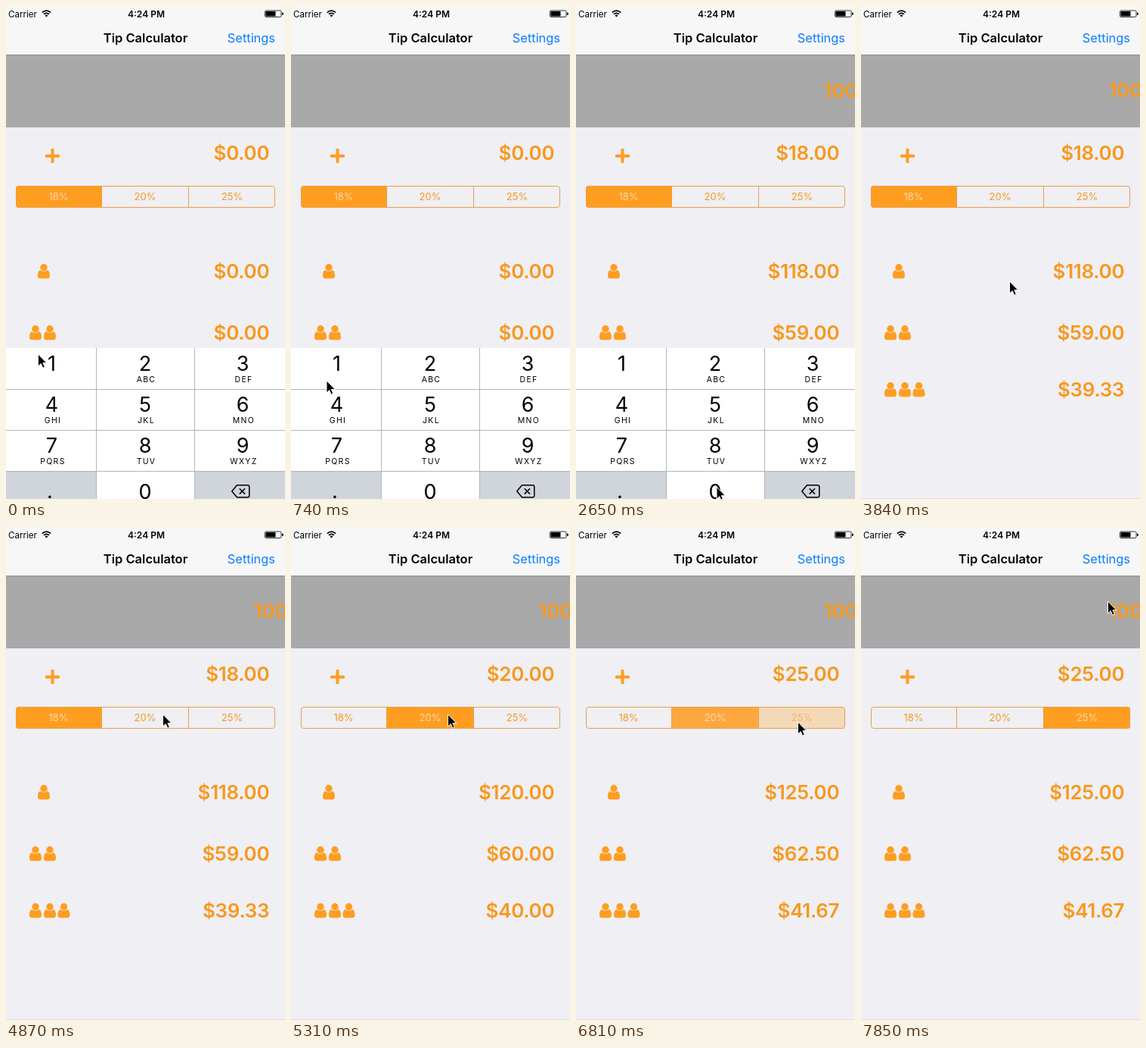
Animation of 369 by 650 pixels, one loop 8000 ms. Source, as an HTML page:

```html
<!DOCTYPE html>
<html lang="en">
<head>
<meta charset="utf-8">
<title>Tip Calculator</title>
<style>
html, body { margin: 0; width: 100%; height: 100%; overflow: hidden; background: #efeff4; }
svg { display: block; font-family: Inter, Roboto, sans-serif; }
.value { font-size: 26px; font-weight: 600; letter-spacing: -.3px; text-anchor: end; fill: #f8981d; }
.seg { font-size: 13px; text-anchor: middle; }
.digit { font-size: 27px; text-anchor: middle; }
.letters { font-size: 10.5px; letter-spacing: 1.3px; text-anchor: middle; }
</style>
</head>
<body>
<svg id="stage" width="369" height="650" viewBox="0 0 369 650"></svg>
<script>
const ORANGE = '#ff9d20', PALE = '#fbd9ac', LOOP = 8000;

const rect = (x, y, w, h, fill, extra = '') =>
  `<rect x="${x}" y="${y}" width="${w}" height="${h}" fill="${fill}" ${extra}/>`;
const text = (x, y, content, attrs = '') => `<text x="${x}" y="${y}" ${attrs}>${content}</text>`;

const person = (x, y) => `<g transform="translate(${x} ${y})" fill="${ORANGE}">
  <circle cy="4.8" r="4.7"/>
  <path d="M-4.4 8.2C-7 8.6-8 11.7-8 15.5Q-8 19.3-4.8 19.3H4.8Q8 19.3 8 15.5C8 11.7 7 8.6 4.4 8.2Q0 11.9-4.4 8.2Z"/></g>`;

const statusBar = () => `
  ${text(3, 14.5, 'Carrier', 'font-size="11.6"')}
  <g fill="none" stroke="#000" stroke-width="1.7">
    <path d="M47.8 8.6Q53.5 3.6 59.2 8.6M50 10.9Q53.5 7.8 57 10.9"/></g>
  <path d="M51.5 12.4Q53.5 10.8 55.5 12.4L53.5 14.6Z"/>
  ${text(185.5, 14.5, '4:24 PM', 'font-size="12" font-weight="600" text-anchor="middle"')}
  ${rect(342.5, 6, 21.5, 8.5, 'none', 'rx="1.5" stroke="#000" stroke-width=".8"')}
  ${rect(343.5, 7, 13, 6.5, '#000', 'rx=".5"')}
  <path d="M365 8.5Q367 8.7 367 10.2T365 12Z"/>`;

const navBar = () => `
  ${rect(0, 0, 369, 64, '#f7f7f8')}${rect(0, 64, 369, 1, '#8f8f91')}
  ${text(184.5, 48, 'Tip Calculator', 'font-size="16.5" font-weight="600" text-anchor="middle"')}
  ${text(356, 48, 'Settings', 'font-size="16.4" fill="#0a7cff" text-anchor="end"')}`;

const segX = [13, 126.5, 241.5, 356];
const segments = () => `
  <clipPath id="round">${rect(13, 237, 343, 29, '#000', 'rx="4"')}</clipPath>
  <g clip-path="url(#round)">${[0, 1, 2].map(i =>
    rect(segX[i], 237, segX[i + 1] - segX[i], 29, ORANGE, 'class="fill"')).join('')}</g>
  ${rect(13.5, 237.5, 342, 28, 'none', 'rx="3.5" stroke="#eb9f45"')}
  <path d="M126.5 238V265M241.5 238V265" stroke="#eb9f45"/>
  ${['18%', '20%', '25%'].map((s, i) => text([69.5, 184, 299][i], 256, s, 'class="seg"')).join('')}`;

const keypad = () => {
  const groups = ['', 'ABC', 'DEF', 'GHI', 'JKL', 'MNO', 'PQRS', 'TUV', 'WXYZ'];
  const keyX = [60.5, 184, 313];
  const keys = groups.map((g, i) => {
    const x = keyX[i % 3], y = 480.5 + 54 * Math.floor(i / 3);
    return text(x, y, i + 1, 'class="digit"') + text(x + 1.5, y + 15.5, g, 'class="letters"');
  }).join('');
  return `<g id="keypad">
    ${rect(0, 451, 369, 199, '#fff')}
    ${rect(0, 614, 119, 36, '#d0d4db')}${rect(250, 614, 119, 36, '#d0d4db')}
    <path d="M119.5 451V650M249.5 451V650M0 505.5H369M0 559.5H369M0 613.5H369" stroke="#b4b5b9"/>
    ${keys}
    ${text(184, 649.5, '0', 'class="digit"')}${text(58, 648.5, '.', 'class="digit"')}
    <path d="M305.5 631.8H319.5Q321.8 631.8 321.8 634V645.5Q321.8 647.8 319.5 647.8H305.5L298.8 639.8ZM308.8 636.2L316 643.4M316 636.2L308.8 643.4"
      fill="none" stroke="#000" stroke-width="1.5" stroke-linejoin="round"/></g>`;
};

const rowY = [203, 359, 440, 515];
const people = [[50, 340], [39, 421], [58, 421], [39, 496], [58, 496], [76.5, 496]];

stage.innerHTML = `
  ${rect(0, 0, 369, 650, '#efeff4')}${navBar()}${statusBar()}
  ${rect(0, 65, 369, 95, '#a9a9a9')}
  ${rect(0, 649, 369, 1, '#dcdce0')}
  ${text(372, 121, '', 'id="amount" class="value"')}
  ${rect(52, 195.7, 19, 4, ORANGE, 'rx="1"')}${rect(59.5, 188, 4, 19, ORANGE, 'rx="1"')}
  ${segments()}
  ${people.map(p => person(...p)).join('')}
  ${rowY.map(y => text(348.3, y, '', 'class="value row"')).join('')}
  ${keypad()}
  <path id="cursor" d="M0 0V16L3.7 12.6 6.2 18.2 8.8 17.1 6.4 11.6H11.4Z" stroke="#fff" stroke-width="1"/>`;

// Tracks hold each entry from its start time until the next one.
const typed = [[0, ''], [1030, '1'], [2510, '10'], [2650, '100']];
const rates = [[0, .18], [5160, .2], [6810, .25]];
const fills = [
  [0, [1, 0, 0]], [5020, [1, .28, 0]], [5160, [.85, .28, 0]], [5310, [0, 1, 0]],
  [6660, [0, 1, .28]], [6810, [0, .85, .28]], [6960, [0, 0, 1]]];
const pointer = [
  [0, [42.5, 459]], [290, [46, 452]], [440, [58, 453]], [590, [62, 475]], [740, [47, 494]],
  [1330, [78, 510]], [1470, [182.5, 579]], [1620, [185, 612]], [1770, [186, 633]],
  [2060, [184.5, 636]], [2210, [186, 634]],
  [3100, [172, 560]], [3240, [160, 430]], [3390, [196.5, 363]],
  [3990, [197, 356]], [4130, [199, 338]], [4280, [202, 312]], [4430, [205, 284]],
  [4570, [207, 263]], [4720, [207, 251]], [4870, [207.5, 247]],
  [6360, [226, 249]], [6510, [272, 256]], [6660, [293.5, 257]],
  [7700, [296, 190]], [7850, [326.5, 98]]];
const at = (track, t) => track.findLast(([start]) => start <= t)[1];

const [rows, fillRects, labels] = ['.row', '.fill', '.seg'].map(s => stage.querySelectorAll(s));
const money = n => '$' + n.toFixed(2);

function draw(now) {
  const t = now % LOOP;
  const bill = at(typed, t), tip = bill * at(rates, t), total = +bill + tip;
  const editing = t < 3840;
  amount.textContent = bill;
  amount.setAttribute('y', editing ? 121 : 120);
  [tip, total, total / 2, total / 3].forEach((n, i) => rows[i].textContent = money(n));
  at(fills, t).forEach((level, i) => {
    fillRects[i].setAttribute('opacity', level);
    labels[i].setAttribute('fill', level > .5 ? PALE : level ? '#f4b26a' : '#f8981d');
  });
  keypadLayer.style.display = editing ? '' : 'none';
  cursor.setAttribute('transform', `translate(${at(pointer, t)})`);
  requestAnimationFrame(draw);
}
const keypadLayer = document.getElementById('keypad');
requestAnimationFrame(draw);
</script>
</body>
</html>
```
